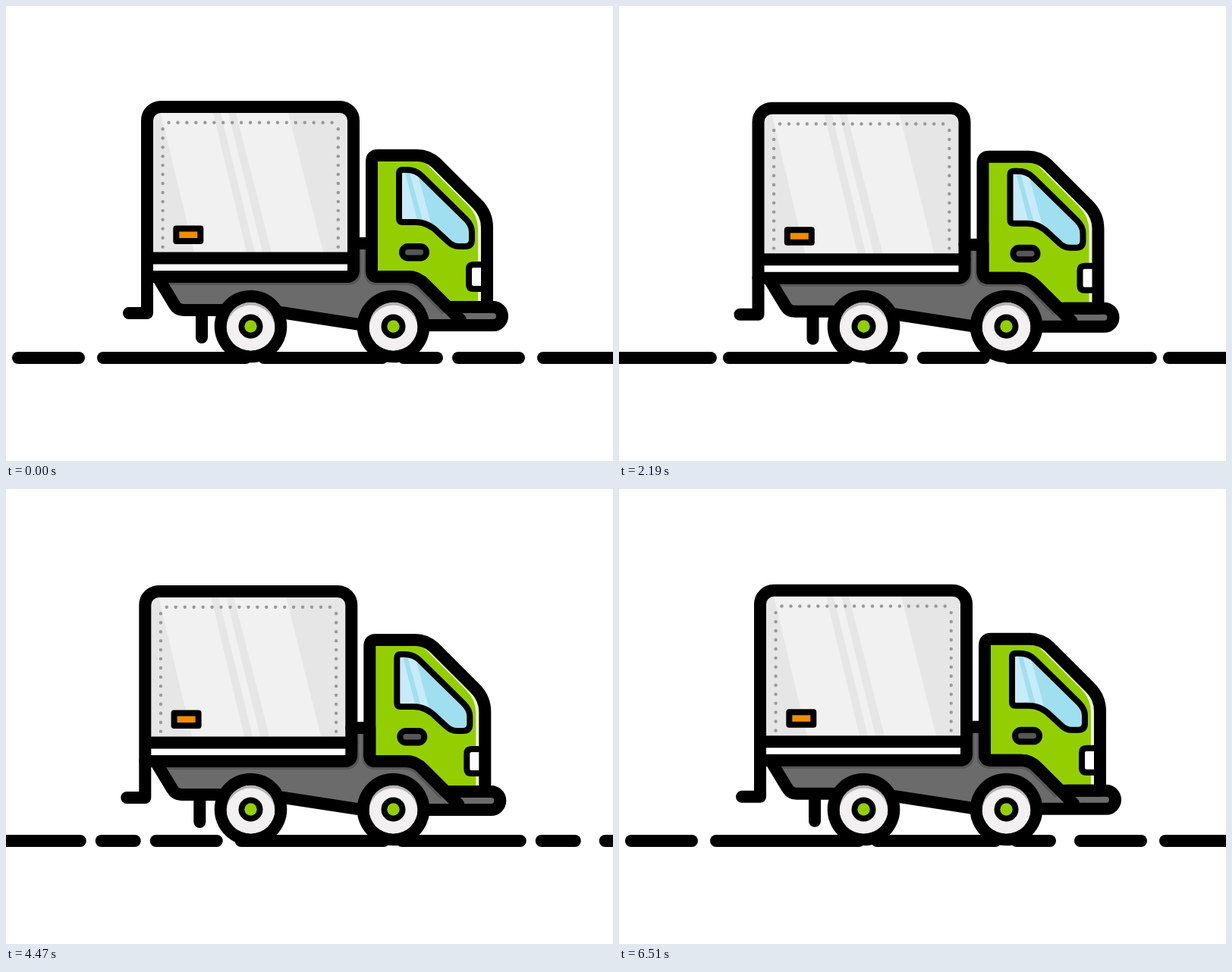
An HTML page that plays this animation: 800 px wide and 600 px high, repeating every 6.54 s.

```html
<!DOCTYPE html>
<html lang="en">
<head>
<meta charset="utf-8">
<title>Truck on the road</title>
<style>
  html, body { margin: 0; width: 100%; height: 100%; overflow: hidden; background: #fff; }
  svg { display: block; width: 100vw; height: 100vh; }
  .line { fill: none; stroke: #000; stroke-width: 16; stroke-linecap: round; stroke-linejoin: round; }
  .thin { stroke: #000; stroke-width: 8; stroke-linejoin: round; }
  .shade { stroke: #565656; }
</style>
</head>
<body>
<svg viewBox="0 0 800 600">
  <defs>
    <path id="cabShape" d="M482 349V205Q482 197 490 197H542Q556 197 567 207L621 261Q634 274 634 292V397H582L553 368Q543 357 530 357H490Q482 357 482 349Z"/>
    <path id="cabFloor" d="M482 313V349Q482 357 490 357H530Q543 357 553 368L599 414"/>
    <path id="boxFloor" d="M186 357H450A8 8 0 0 0 458 349V313"/>
    <path id="chassisShape" d="M198 357H458V313H482V357H540L603 421H470L362 404V401H234Q226 401 222 394Z"/>
    <path id="windowShape" d="M518 221Q518 216 523 216H528Q540 216 548 224L606 281Q614 289 614 298V308Q614 317 605 317H597Q589 317 583 311L571 300Q557 285 540 285H523Q518 285 518 280Z"/>
    <path id="bumper" d="M590 397H642A12 12 0 0 1 642 421H550"/>
    <clipPath id="chassisClip"><use href="#chassisShape"/></clipPath>
    <clipPath id="cabClip"><use href="#cabShape"/></clipPath>
    <clipPath id="windowClip"><use href="#windowShape"/></clipPath>
    <clipPath id="boxClip"><rect x="186" y="133" width="272" height="200" rx="18"/></clipPath>
    <clipPath id="rimClip"><circle r="32"/></clipPath>
    <g id="wheel">
      <circle r="47.8"/>
      <g clip-path="url(#rimClip)">
        <circle r="32" fill="#b4b2b2"/>
        <circle cy="4" r="32" fill="#f2f0f1"/>
      </g>
      <circle r="16"/>
      <circle r="8.2" fill="#93cf00"/>
    </g>
  </defs>

  <g id="road"></g>

  <g id="body">
    <use href="#chassisShape" fill="#6b6b6b"/>
    <g clip-path="url(#chassisClip)">
      <use href="#boxFloor" class="line shade" transform="translate(2 3)"/>
      <use href="#cabFloor" class="line shade" transform="translate(-2 3)"/>
    </g>
    <path class="line" d="M202 361L222 394Q226 401 234 401H300M258 401V437"/>
    <path class="line" d="M362 404L470 420.7M458 313H482"/>

    <path d="M186 332H458V357H186Z" fill="#fff"/>
    <g clip-path="url(#boxClip)">
      <path d="M186 133H458V333H186Z" fill="#e6e6e6"/>
      <path d="M202 133H370L418 325H248Z" fill="#f1f1f1"/>
      <path d="M273 141H283L328 325H317ZM293 141H303L350 325H338Z" fill="#e6e6e6"/>
    </g>
    <g id="stitches" fill="#999"></g>
    <rect class="thin" x="224.3" y="293.5" width="32" height="16.5" fill="#f08c00"/>
    <path class="line" d="M162 405H186V151A18 18 0 0 1 204 133H440A18 18 0 0 1 458 151V313M186 332.5H458"/>
    <use href="#boxFloor" class="line"/>

    <g clip-path="url(#cabClip)">
      <use href="#cabShape" fill="#ecf6d2"/>
      <use href="#cabShape" fill="#93cf00" transform="translate(-12 2)"/>
    </g>
    <g clip-path="url(#windowClip)">
      <use href="#windowShape" fill="#9fdfef"/>
      <path d="M518 216H525L543 286H518ZM531 216H541L560 286H550Z" fill="#c8ebf9"/>
    </g>
    <use href="#windowShape" class="thin" fill="none"/>
    <rect class="thin" x="522" y="317" width="32" height="15.5" rx="7.75" fill="#565656"/>
    <path class="thin" d="M632 341H616Q610 341 610 347V367Q610 373 616 373H632" fill="#fff"/>

    <use href="#bumper" fill="#6b6b6b"/>
    <use href="#cabShape" class="line"/>
    <use href="#cabFloor" class="line"/>
    <use href="#bumper" class="line"/>
  </g>

  <use href="#wheel" x="322.5" y="422.5"/>
  <use href="#wheel" x="510.5" y="422.5"/>
</svg>
<script>
  const LOOP = 6540, STEP = 30, ROAD_SHIFT = 580;
  const BOUNCE = 1.5, BOUNCE_TIME = 700;
  const road = document.getElementById('road');
  const body = document.getElementById('body');
  const stitches = document.getElementById('stitches');

  function add(parent, tag, attrs) {
    const node = document.createElementNS('http://www.w3.org/2000/svg', tag);
    for (const key in attrs) node.setAttribute(key, attrs[key]);
    parent.appendChild(node);
  }

  // Each road tile repeats the same dashes: [offset, length]
  const dashes = [[0, 96], [112, 204], [324, 172], [508, 60]];
  for (const tile of [8, 588, 1180])
    for (const [offset, width] of dashes)
      add(road, 'rect', { x: tile + offset, y: 456, width, height: 16, rx: 8 });

  function stitchRow(x, y, dx, dy, count) {
    for (let i = 0; i < count; i++)
      add(stitches, 'circle', { cx: x + i * dx, cy: y + i * dy, r: 2.2 });
  }
  stitchRow(214.5, 153.7, 11.95, 0, 19);
  stitchRow(206.6, 162.3, 0, 11.95, 14);
  stitchRow(437.8, 162.3, 0, 11.95, 14);

  // Key poses of the body, joined by eased moves with small bounces
  const poses = [
    { at: 0, x: 0, y: 0 }, { at: 1620, x: -3, y: 0 }, { at: 2760, x: -2, y: 3.5 },
    { at: 3510, x: 0.5, y: 0 }, { at: 4470, x: -2.7, y: 2 }, { at: 5730, x: 0, y: 1.5 },
    { at: LOOP, x: 0, y: 0.8 }
  ];

  const mix = (a, b, k) => a + (b - a) * k;

  function poseAt(t) {
    const i = poses.findIndex(pose => pose.at > t);
    const from = poses[i - 1], to = poses[i];
    const span = to.at - from.at, k = (t - from.at) / span;
    const ease = (1 - Math.cos(Math.PI * k)) / 2;
    const hops = Math.round(span / BOUNCE_TIME);
    const bounce = BOUNCE * Math.sin(Math.PI * hops * k) ** 2;
    return [mix(from.x, to.x, ease), mix(from.y, to.y, ease) + bounce];
  }

  function draw(now) {
    const t = Math.floor((now % LOOP) / STEP) * STEP;
    const [x, y] = poseAt(t);
    road.setAttribute('transform', `translate(${-ROAD_SHIFT * t / (LOOP - STEP)} 0)`);
    body.setAttribute('transform', `translate(${x} ${y})`);
  }

  let start;
  function tick(now) {
    start ??= now;
    draw(now - start);
    requestAnimationFrame(tick);
  }
  draw(0);
  requestAnimationFrame(tick);
</script>
</body>
</html>
```
